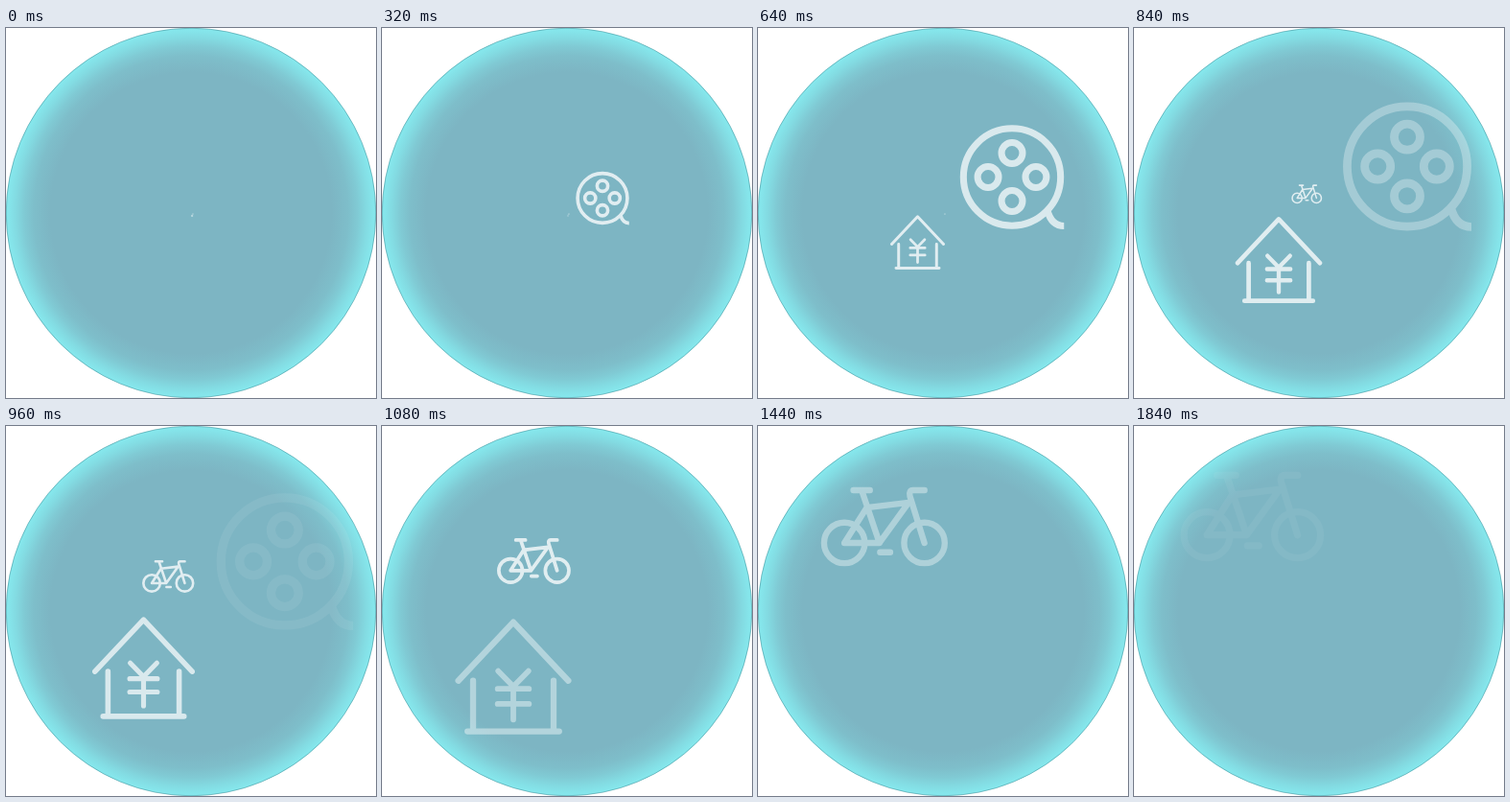
Write an HTML page that moves like this. It is 386 px wide and 386 px high and loops after 1960 ms.

```html
<!DOCTYPE html>
<html lang="en">
<head>
<meta charset="utf-8">
<title>Floating icons</title>
<style>
  html, body { margin: 0; width: 100%; height: 100%; overflow: hidden; background: #fff; }
  svg { display: block; width: 100%; height: 100%; }
  .icon { fill: none; stroke: #fff; stroke-linecap: round; stroke-linejoin: round; }
</style>
</head>
<body>
<svg viewBox="0 0 386 386">
  <defs>
    <radialGradient id="glow">
      <stop offset=".76" stop-color="#7db5c3"/>
      <stop offset=".85" stop-color="#7ebeca"/>
      <stop offset=".9" stop-color="#80cad4"/>
      <stop offset=".95" stop-color="#83dbe2"/>
      <stop offset="1" stop-color="#86e9ee"/>
    </radialGradient>
  </defs>
  <circle cx="193" cy="193" r="193" fill="url(#glow)"/>
  <circle cx="193" cy="193" r="192.8" fill="none" stroke="#24616c" stroke-width=".6" stroke-opacity=".6"/>

  <!-- Icons are drawn 100 units wide around their centre -->
  <g id="house" class="icon" stroke-width="5.2">
    <path d="M-47.4 3.5L0-47L47.4 3.5M-34.7 3.5V47M34.7 3.5V47M-39.5 47.2H39.5"/>
    <path stroke-width="4.8" d="M-13-4.8L0 8.5L13-4.8M0 8.5V37M-13.5 10.5H13.5M-13.5 23.5H13.5"/>
  </g>
  <g id="reel" class="icon" stroke-width="6.5">
    <circle r="46.7"/>
    <circle cy="-23" r="10.1"/>
    <circle cx="23" r="10.1"/>
    <circle cy="23" r="10.1"/>
    <circle cx="-23" r="10.1"/>
    <path stroke-linecap="butt" d="M34 32Q38 47 50 47"/>
  </g>
  <g id="bike" class="icon" stroke-width="4.8">
    <circle cx="-31.6" cy="12.8" r="16"/>
    <circle cx="31.4" cy="12.8" r="16"/>
    <path d="M-24.5-28.7H-11.5M-18-28.7L-4 12.8H-31.6L-14-15L19-19L-4 12.8"/>
    <path d="M31.5-28.7H22.5Q19-28.7 20-24L31.4 12.8M-3.5 20.2H4.5"/>
  </g>
</svg>
<script>
const LOOP = 1960, STEP = 40;

// Keys: time, centre x, centre y, size
const icons = [
  { id: 'reel', start: 0, keys: [
    [0, 194, 196, 2], [320, 230, 177.5, 55.5], [640, 265, 155.5, 108.5],
    [840, 285, 144.5, 134], [1000, 292.5, 140.5, 145]] },
  { id: 'house', start: 320, keys: [
    [320, 194, 195.5, 2], [640, 166.5, 223.5, 57], [840, 151, 242, 90.5],
    [1080, 137, 261.5, 121], [1320, 127, 273, 141]] },
  { id: 'bike', start: 650, hold: 1600, keys: [
    [640, 195, 194, 2], [840, 180.3, 173.3, 32], [1080, 158.5, 141, 77],
    [1440, 132, 105, 132.5], [1600, 123.5, 94.5, 150]] }
];
const fade = [[0, .78], [620, .76], [760, .42], [840, .3], [950, .08], [1040, 0]];

for (const icon of icons) icon.node = document.getElementById(icon.id);

function segment(keys, t) {
  let i = 0;
  while (i < keys.length - 2 && t >= keys[i + 1][0]) i++;
  const [a, b] = [keys[i][0], keys[i + 1][0]];
  return [i, Math.min(1, Math.max(0, (t - a) / (b - a)))];
}

function linear(keys, t) {
  const [i, u] = segment(keys, t);
  return keys[i][1] + (keys[i + 1][1] - keys[i][1]) * u;
}

function slope(keys, i, k) {
  const a = keys[Math.max(0, i - 1)], b = keys[Math.min(keys.length - 1, i + 1)];
  return (b[k] - a[k]) / (b[0] - a[0]);
}

// Smooth Hermite curve through the keys
function spline(keys, t, k) {
  const [i, u] = segment(keys, t);
  const a = keys[i], b = keys[i + 1], d = b[0] - a[0], v = 1 - u;
  return v * v * (1 + 2 * u) * a[k] + u * u * (3 - 2 * u) * b[k]
    + d * u * v * (v * slope(keys, i, k) - u * slope(keys, i + 1, k));
}

function draw(time) {
  const t = Math.floor(time % LOOP / STEP) * STEP;
  for (const { node, keys, start, hold } of icons) {
    const local = hold ? Math.min(t, hold) : t;
    const [x, y, size] = [1, 2, 3].map(k => spline(keys, local, k));
    const alpha = hold && t >= 1840 ? .05 : linear(fade, local - start);
    node.setAttribute('transform', `translate(${x} ${y}) scale(${size / 100})`);
    node.setAttribute('opacity', alpha);
  }
}

let origin;
function tick(now) {
  origin ??= now;
  draw(now - origin);
  requestAnimationFrame(tick);
}
draw(0);
requestAnimationFrame(tick);
</script>
</body>
</html>
```
